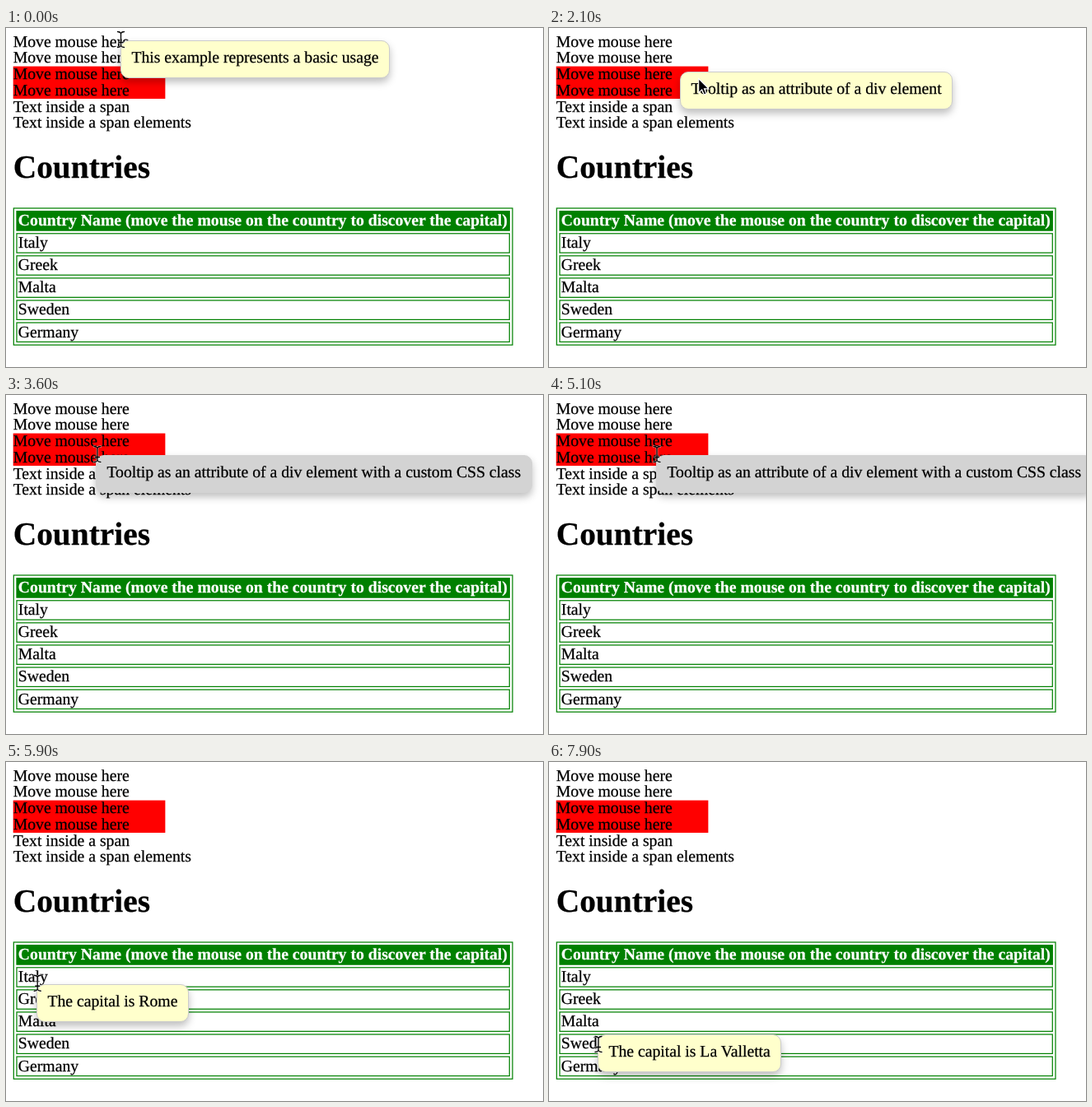
Animation of 652 by 412 pixels, one loop 8 s. Source, as an HTML page:

```html
<!DOCTYPE html>
<html lang="en">
<head>
<meta charset="utf-8">
<title>Tooltips</title>
<style>
  html, body { margin: 0; width: 100%; height: 100%; overflow: hidden; background: #fff; }
  #stage {
    position: relative; width: 652px; height: 412px; overflow: hidden; color: #000;
    font: 19.7px/19.7px "Liberation Serif", Times, serif;
    text-rendering: geometricPrecision;
  }
  svg { position: absolute; left: 0; top: 0; }
  text { fill: currentColor; stroke: currentColor; stroke-width: .25; }
  .title { font-size: 39.4px; font-weight: bold; }
  .head { color: #fff; font-weight: bold; }
  .box { fill: none; stroke: #008000; stroke-width: 1.23; }
  .fill { fill: #008000; }
  #tip {
    position: absolute; left: 0; top: 0; padding: 11.3px 12.4px 13px; white-space: nowrap;
    border: 1px solid #ccc; border-radius: 10px; background: #ffffcc;
    box-shadow: 0 5px 10px rgba(0, 0, 0, .25); -webkit-text-stroke: .25px;
  }
  #tip.gray { background: #d3d3d3; border-color: #d3d3d3; }
</style>
</head>
<body>
<div id="stage">
  <svg id="page" width="652" height="412"></svg>
  <div id="tip"></div>
  <svg width="652" height="412">
    <defs>
      <path id="bar" d="M-4-9.5Q-1-9.5 0-7.5Q1-9.5 4-9.5M0-7.5V7.5M-4 9.5Q-1 9.5 0 7.5Q1 9.5 4 9.5M-2.5 3.5H2.5"/>
    </defs>
    <g id="beam" fill="none" stroke-linecap="round">
      <use href="#bar" stroke="#fff" stroke-opacity=".6" stroke-width="2.6"/>
      <use href="#bar" stroke="#000" stroke-width="1.3"/>
    </g>
    <path id="arrow" d="M0 0V17L4 13.3L6.6 19.4L9.4 18.2L6.8 12.2H12.2Z" stroke="#fff" stroke-width="1.1"/>
  </svg>
</div>
<script>
  const $ = id => document.getElementById(id);
  const page = $('page'), tip = $('tip'), beam = $('beam'), arrow = $('arrow');
  const LOOP = 8000, STEP = 100;

  // Layout in page units of S pixels
  const S = 1.231, LEFT = 8.7, TOP = 7.2, TABLE = 218.4;
  const LINE = 16 * S, ROW = 22 * S, ASCENT = 15.6;

  function add(tag, attrs, text = '') {
    const el = document.createElementNS('http://www.w3.org/2000/svg', tag);
    for (const key in attrs) el.setAttribute(key, attrs[key]);
    el.textContent = text;
    return page.appendChild(el);
  }

  // Rectangle whose border lies inside the given edges
  const box = (x, y, width, height, cls) =>
    add('rect', { x: x + S / 2, y: y + S / 2, width: width - S, height: height - S, class: cls });

  const lines = [
    { text: 'Move mouse here', tip: 'This example represents a basic usage' },
    { text: 'Move mouse here', tip: 'This example uses a custom CSS class', gray: true },
    { text: 'Move mouse here', tip: 'Tooltip as an attribute of a div element' },
    { text: 'Move mouse here', tip: 'Tooltip as an attribute of a div element with a custom CSS class', gray: true },
    { text: 'Text inside a span' },
    { text: 'Text inside a span elements' }
  ];
  const cells = [
    { text: 'Country Name (move the mouse on the country to discover the capital)' },
    { text: 'Italy', tip: 'The capital is Rome' },
    { text: 'Greek', tip: 'The capital is Athens' },
    { text: 'Malta', tip: 'The capital is La Valletta' },
    { text: 'Sweden' },
    { text: 'Germany' }
  ];

  add('rect', { x: LEFT, y: TOP + 2 * LINE, width: 150 * S, height: 2 * LINE, fill: '#f00' });
  lines.forEach((row, i) => {
    row.top = TOP + i * LINE;
    row.bottom = row.top + LINE;
    row.label = add('text', { x: LEFT, y: row.top + ASCENT }, row.text);
  });

  add('text', { x: LEFT, y: 182, class: 'title' }, 'Countries');

  box(LEFT, TABLE, 493 * S, 136 * S, 'box');
  cells.forEach((row, i) => {
    row.top = TABLE + 3 * S + i * ROW;
    row.bottom = row.top + ROW;
    box(LEFT + 3 * S, row.top, 487 * S, 20 * S, i ? 'box' : 'box fill');
    row.label = add('text', { x: LEFT + 5 * S, y: row.top + 2 * S + ASCENT, class: i ? '' : 'head' }, row.text);
  });

  const rows = [...lines, ...cells];
  const rowAt = y => rows.find(row => y >= row.top && y < row.bottom);

  // Resting points of the pointer: time, x, y
  const stops = [
    [0, 139.5, 14], [800, 139, 14], [1150, 133, 31], [1800, 126, 38], [2200, 192, 66],
    [2550, 144, 55], [3000, 106, 72], [5100, 131, 72], [5800, 37, 269], [6700, 72, 261],
    [6800, 99, 270], [7300, 66, 325], [7800, 59, 330], [7900, 60, 343]
  ];

  const ease = p => p * p * (3 - 2 * p);

  function pointer(t) {
    const i = stops.findIndex(stop => stop[0] >= t);
    if (i < 1) return stops[0].slice(1);
    const [t0, x0, y0] = stops[i - 1], [t1, x1, y1] = stops[i];
    const p = ease((t - t0) / (t1 - t0));
    return [x0 + (x1 - x0) * p, y0 + (y1 - y0) * p];
  }

  function overText(x, y) {
    const row = rowAt(y);
    if (!row) return false;
    const { x: left, width } = row.label.getBBox();
    return x < left + width;
  }

  const show = (el, on) => { el.style.display = on ? '' : 'none'; };

  function draw(now) {
    const t = Math.floor(now % LOOP / STEP) * STEP;
    const [x, y] = pointer(t);
    const onText = overText(x, y);
    show(beam, onText);
    show(arrow, !onText);
    (onText ? beam : arrow).setAttribute('transform', `translate(${x} ${y})`);

    // The tooltip trails the pointer by one step
    const [tx, ty] = pointer(Math.max(0, t - STEP));
    const row = rowAt(ty);
    show(tip, row && row.tip);
    if (row && row.tip) {
      tip.textContent = row.tip;
      tip.className = row.gray ? 'gray' : '';
      tip.style.transform = `translate(${Math.round(tx - .4)}px, ${Math.round(ty + 1)}px)`;
    }
  }

  const start = performance.now();
  (function frame() {
    draw(performance.now() - start);
    requestAnimationFrame(frame);
  })();
</script>
</body>
</html>
```
